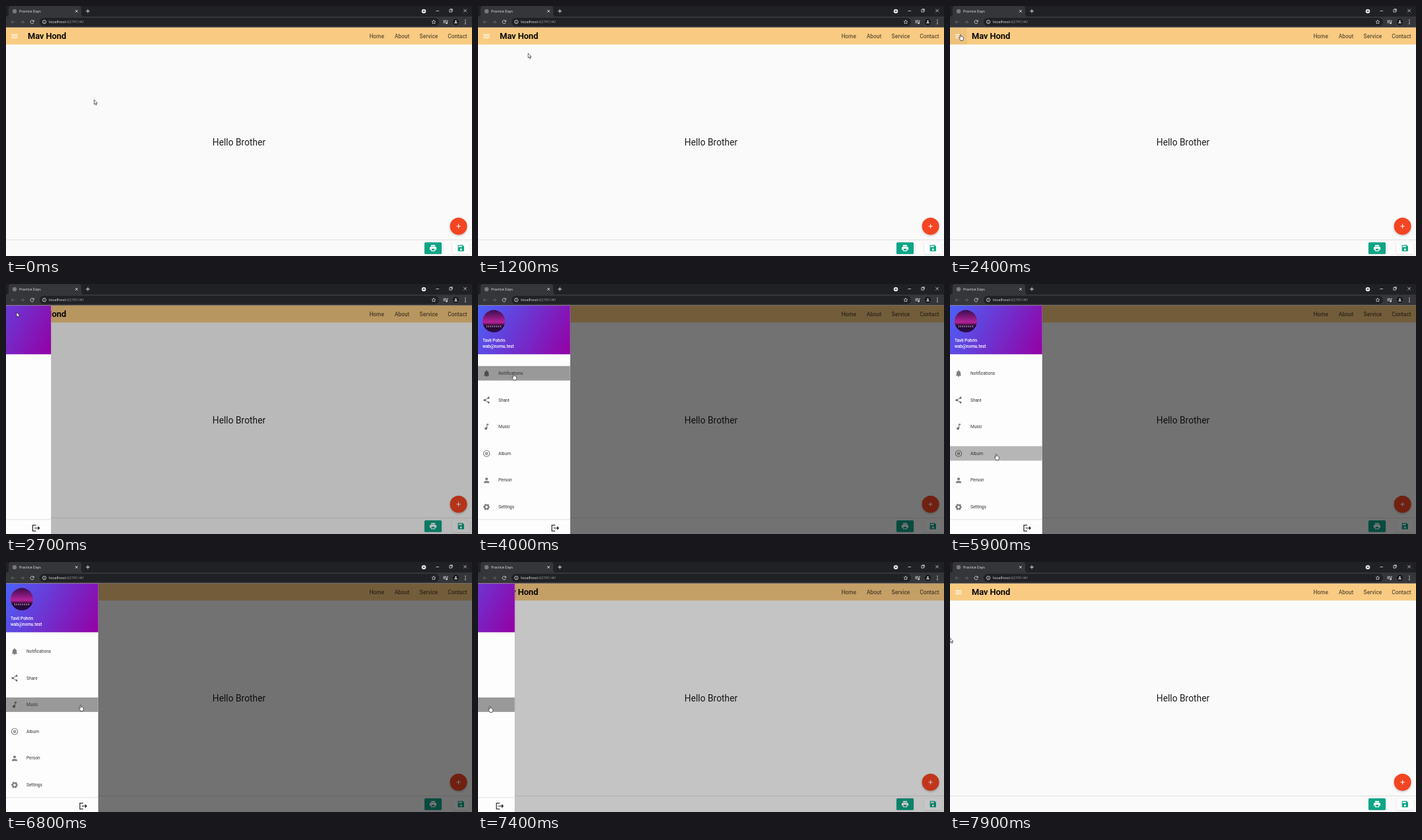
Write an HTML page that moves like this. It is 706x380 px and loops after 8 s.

```html
<!DOCTYPE html>
<html lang="en">
<head>
<meta charset="utf-8">
<title>Practice Days</title>
<style>
html, body { margin: 0; width: 100%; height: 100%; overflow: hidden; background: #fafafa; }
svg { display: block; }
text { font-family: Roboto, sans-serif; white-space: pre; }
.chrome text { font-family: "Open Sans", "Noto Sans", sans-serif; }
.nav { font-size: 8.4px; font-weight: 500; fill: #000; fill-opacity: .6; }
.item { font-size: 6.55px; fill: #333; }
.user { font-size: 6.5px; font-weight: 500; fill: #fff; }
.line { fill: none; stroke: #dfe1e4; stroke-width: .8; }
</style>
</head>
<body>
<svg id="stage" width="706" height="380" viewBox="0 0 706 380">
  <defs>
    <linearGradient id="header" gradientUnits="userSpaceOnUse" x1="0" y1="33" x2="140" y2="107">
      <stop offset="0" stop-color="#4b62f8"/><stop offset="1" stop-color="#9400a4"/>
    </linearGradient>
    <linearGradient id="photo" x1="0" y1="0" x2="0" y2="1">
      <stop offset="0" stop-color="#3a0d4c"/><stop offset=".55" stop-color="#b5229a"/>
      <stop offset=".7" stop-color="#240a2c"/><stop offset="1" stop-color="#2a0c48"/>
    </linearGradient>
    <filter id="shadow" x="-30%" y="-30%" width="160%" height="170%">
      <feDropShadow dx="0" dy="1.3" stdDeviation="1.5" flood-opacity=".25"/>
    </filter>
    <filter id="soft" x="-30%" y="-30%" width="160%" height="170%">
      <feDropShadow dx="0" dy=".6" stdDeviation=".8" flood-opacity=".14"/>
    </filter>
    <clipPath id="page"><rect y="32.7" width="706" height="348"/></clipPath>
  </defs>

  <g class="chrome" id="chrome">
    <rect width="706" height="17" fill="#202124"/>
    <rect y="16" width="706" height="18" fill="#35363a"/>
    <path d="M1 16q3 0 3-3V4q0-4 4-4h102q4 0 4 4v9q0 3 3 3z" fill="#35363a"/>
    <circle cx="13" cy="8" r="3.2" fill="#77797c"/>
    <text x="20" y="10" font-size="5.3" fill="#e8eaed">Practice Days</text>
    <rect x="51" y="18" width="605" height="12.6" rx="6.3" fill="#202124"/>
    <text x="65" y="26.4" font-size="6.1" fill="#9aa0a6"><tspan fill="#e8eaed">localhost</tspan>:62741/#/</text>
    <g class="line">
      <path d="M105 6l3.6 3.6m0-3.6L105 9.6M121.2 7.8h5.6m-2.8-2.8v5.6" stroke-width="1"/>
      <path d="M651.3 7.5h4.8M671.9 5.6h3.4v3.6h-3.4zm1-1h3.4v3.6M693.3 4.8l4.6 4.6m0-4.6l-4.6 4.6"/>
      <circle cx="58" cy="24.2" r="2.7"/>
      <path d="M58 23.8v1.8m0-3.1v.7"/>
      <path d="M696 21.5v6" stroke-width="1.6" stroke-linecap="round" stroke-dasharray="0 2.7"/>
    </g>
    <circle cx="633" cy="8" r="3.3" fill="#dfe1e4"/>
    <path d="M631.4 7.2h3.2L633 9.3z" fill="#202124"/>
    <circle cx="681.5" cy="24.2" r="4.6" fill="#17181a"/>
  </g>

  <g clip-path="url(#page)">
    <g id="app">
      <rect y="32" width="706" height="348" fill="#fafafa"/>
      <rect y="32" width="706" height="26.5" fill="#f9cb82"/>
      <rect id="menuHover" y="32" width="26" height="26.5" fill="#000"/>
      <text x="33" y="50.2" font-size="12.75" font-weight="500" stroke="#000" stroke-width=".2">Mav Hond</text>
      <g class="nav">
        <text x="550.4" y="48.9">Home</text><text x="588.7" y="48.9">About</text>
        <text x="626.6" y="48.9">Service</text><text x="669.2" y="48.9">Contact</text>
      </g>
      <text x="353" y="211.6" font-size="13.8" text-anchor="middle" fill="#1d1d1d">Hello Brother</text>
      <rect y="355" width="706" height="1" fill="#e0e0e0"/>
      <circle cx="685.6" cy="334.8" r="13" fill="#f44424" filter="url(#shadow)"/>
      <path d="M682.4 334.8h6.4m-3.2-3.2v6.4" stroke="#fff" stroke-width="1.1"/>
      <rect x="634" y="359.2" width="26" height="17.8" rx="1.5" fill="#0ca587" filter="url(#soft)"/>
      <rect x="676" y="359.2" width="26.5" height="17.8" rx="1.5" fill="#fcfcfc" filter="url(#soft)"/>
    </g>
    <rect id="scrim" y="32" width="706" height="348" fill="#000"/>
    <g id="drawer">
      <rect y="32" width="139.7" height="348" fill="#fdfdfd" filter="url(#soft)"/>
      <rect y="32" width="139.7" height="74.8" fill="url(#header)"/>
      <circle cx="24" cy="56.6" r="17" fill="url(#photo)"/>
      <path d="M13 64.5h22" stroke="#e3b4e3" stroke-width="2.6" stroke-dasharray="1 2"/>
      <text class="user" x="7" y="87.6">Tavil Pohrin</text>
      <text class="user" x="7" y="96.8">wab@nomu.test</text>
      <g id="rows"></g>
      <rect y="357.5" width="139.7" height="1" fill="#dedede"/>
    </g>
  </g>

  <g id="cursor" stroke="#222" stroke-width=".7" stroke-linejoin="round" fill="#fff">
    <path id="arrow" d="M0 0v7l1.6-1.4 1.1 2.5 1.2-.5-1.1-2.4h2.1z"/>
    <path id="hand" d="M-.8.8Q0-.8.8.8v2.6q2-.6 3.6 1.3v2.2q0 1-.7 2v.8H-.2v-.8Q-1.3 7.6-2.4 5.5q-.2-1 .8-.8l.8.9z"/>
  </g>
</svg>
<script>
const LOOP = 8000, STEP = 100, FADE = 200;
const DRAWER = 140, ROW_TOP = 124.7, ROW_PITCH = 40.6, ROW_HEIGHT = 22;
const $ = id => document.getElementById(id);
const append = (id, markup) => $(id).insertAdjacentHTML('beforeend', markup);

// Icons are drawn in a 24-unit box
const solid = d => `<path fill-rule="evenodd" d="${d}"/>`;
const stroke = (d, width = 2) => `<path fill="none" stroke="currentColor" stroke-width="${width}" d="${d}"/>`;
const ring = (r, width, extra = '') =>
  `<circle cx="12" cy="12" r="${r}" fill="none" stroke="currentColor" stroke-width="${width}" ${extra}/>`;
const dot = (x, y, r) => `<circle cx="${x}" cy="${y}" r="${r}"/>`;
const starPath = 'M' + Array.from({ length: 10 }, (_, i) => {
  const r = i % 2 ? 4.2 : 9, a = i * Math.PI / 5;
  return `${12 + r * Math.sin(a)} ${12.5 - r * Math.cos(a)}`;
}).join('L') + 'z';

const icons = {
  menu: stroke('M3 7h18M3 12h18M3 17h18'),
  bell: solid('M4 19v-1l2-2v-5a6 6 0 0112 0v5l2 2v1z') + dot(12, 20, 2) + dot(12, 4, 1.5),
  share: stroke('M18 5L6 12l12 7') + dot(18, 5, 3) + dot(6, 12, 3) + dot(18, 19, 3),
  note: solid('M12 3h6v4h-4v10h-2z') + dot(10, 17, 4),
  album: ring(9, 2) + ring(3.5, 2) + dot(12, 12, 1.6),
  person: dot(12, 8, 4) + solid('M4 20v-2q1-4 8-4t8 4v2z'),
  gear: ring(5.6, 4) + ring(8.6, 2.4, 'stroke-dasharray="4.5 4.5" stroke-dashoffset="2.2"'),
  print: solid('M6 3h12v4H6zM2 17v-6q0-3 3-3h14q3 0 3 3v6h-4v4H6v-4zM8 14h8v5H8z'),
  save: solid('M3 3h14l4 4v14H3zM5 5h10v4H5zM9 16a3 3 0 006 0 3 3 0 00-6 0z'),
  exit: stroke('M12 4H3v16h9M8 12h13m-4-4l4 4-4 4'),
  back: stroke('M20 12H5m7-7l-7 7 7 7'),
  forward: stroke('M4 12h15m-7-7l7 7-7 7'),
  reload: stroke('M17 7a7 7 0 102 7') + solid('M13 11h7V4z'),
  star: stroke(starPath),
  queue: stroke('M3 7h12M3 11h12M3 15h8M22 7h-4v10') + dot(16, 17, 3)
};
const icon = (name, cx, cy, color, size = 12.4) =>
  `<g transform="translate(${cx - size / 2} ${cy - size / 2}) scale(${size / 24})" fill="${color}" color="${color}">${icons[name]}</g>`;

append('app', icon('menu', 13, 46, '#fff') + icon('print', 647, 368, '#fff') + icon('save', 689.3, 368, '#0ca587'));
append('drawer', icon('exit', 117, 371, '#111', 13.5));
append('chrome', icon('back', 10.5, 24.2, '#75777b', 8.6) + icon('forward', 25, 24.2, '#75777b', 8.6) +
  icon('reload', 39.5, 24.2, '#e8eaed', 9) + icon('star', 648, 24.2, '#dfe1e4', 8.4) +
  icon('queue', 666, 24.2, '#dfe1e4', 9.4) + icon('person', 681.5, 24, '#e8eaed', 7));

const items = [['bell', 'Notifications'], ['share', 'Share'], ['note', 'Music'],
  ['album', 'Album'], ['person', 'Person'], ['gear', 'Settings']];
const rowTop = i => ROW_TOP + i * ROW_PITCH;
items.forEach(([name, label], i) => {
  const y = rowTop(i), mid = y + ROW_HEIGHT / 2;
  append('rows', `<rect class="hover" y="${y}" width="139.7" height="${ROW_HEIGHT}" fill="#999"/>` +
    icon(name, 13, mid + .2, 'rgba(0,0,0,.5)') + `<text class="item" x="31" y="${mid + 2.2}">${label}</text>`);
});
const hovers = [...document.querySelectorAll('.hover')];

// Pointer strokes: start, end, destination
const START = { x: 133.5, y: 142.5 };
const strokes = [
  [500, 800, 212, 172], [800, 1100, 97, 82], [1100, 1400, 16, 43], [2900, 3200, 23, 40],
  [3300, 3950, 54, 136.5], [4000, 4200, 56, 167], [4700, 5100, 66, 215], [5300, 5600, 69, 269],
  [5750, 5950, 70, 256], [5950, 6300, 180, 222], [6400, 6700, 113, 217],
  [7000, 7500, 7, 219], [7500, 7900, 0, 115.5]
];

const clamp = v => Math.max(0, Math.min(1, v));
const smooth = p => p * p * (3 - 2 * p);

function pointerAt(t) {
  return strokes.reduce((from, [start, end, x, y]) => {
    const p = smooth(clamp((t - start) / (end - start)));
    return { x: from.x + (x - from.x) * p, y: from.y + (y - from.y) * p };
  }, START);
}

// Opens with a decelerating slide, is dragged shut by the pointer, then settles
function drawerAt(t) {
  if (t < 7000) return DRAWER * (1 - (1 - clamp((t - 2620) / 280)) ** 2);
  return Math.min(DRAWER, pointerAt(t).x + 38) * (1 - clamp((t - 7500) / 200));
}

function onMenu(t) {
  const { x, y } = pointerAt(t);
  return !drawerAt(t) && x < 26 && y > 33 && y < 58;
}

function onRow(t, i) {
  const { x, y } = pointerAt(t);
  return x < drawerAt(t) && y >= rowTop(i) && y < rowTop(i) + ROW_HEIGHT;
}

// Share of the last FADE ms for which the test held
function faded(t, test) {
  const samples = 10;
  let hits = 0;
  for (let k = 0; k < samples; k++) hits += test(t - k * FADE / samples);
  return hits / samples;
}

function draw(t) {
  const { x, y } = pointerAt(t), width = drawerAt(t);
  $('drawer').setAttribute('transform', `translate(${width - DRAWER} 0)`);
  $('drawer').style.display = width ? '' : 'none';
  $('scrim').setAttribute('opacity', .54 * width / DRAWER);
  $('menuHover').setAttribute('opacity', .045 * faded(t, onMenu));
  hovers.forEach((rect, i) => rect.setAttribute('opacity', faded(t, s => onRow(s, i))));

  const pointing = onMenu(t) || items.some((_, i) => onRow(t, i));
  $('hand').style.display = pointing ? '' : 'none';
  $('arrow').style.display = pointing ? 'none' : '';
  $('cursor').setAttribute('transform', `translate(${x} ${y})`);
}

function tick() {
  draw(Math.floor(performance.now() % LOOP / STEP) * STEP);
  requestAnimationFrame(tick);
}
tick();
</script>
</body>
</html>
```
